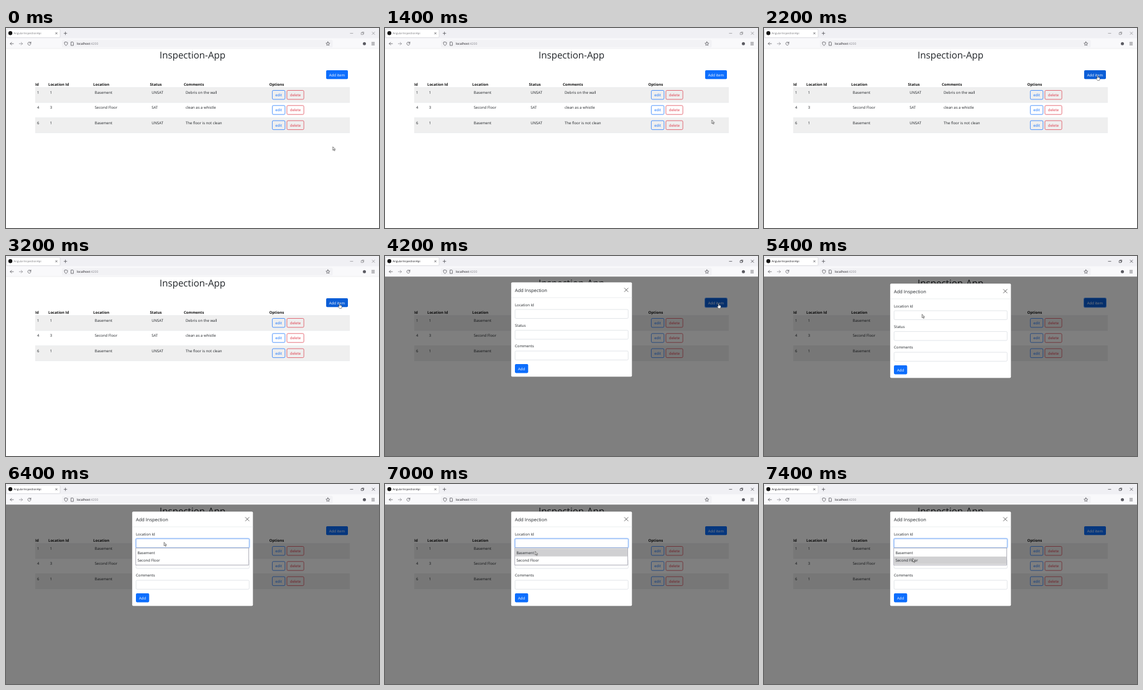
Write an HTML page that moves like this. It is 600 px wide and 322 px high and loops after 8000 ms.

```html
<!DOCTYPE html>
<html lang="en">
<head>
<meta charset="utf-8">
<title>Inspection-App</title>
<style>
  html, body { margin: 0; width: 100%; height: 100%; overflow: hidden; background: #fff; }
  svg { display: block; width: 600px; height: 322px; }
  text { font: 6px "Open Sans", "Noto Sans", sans-serif; fill: #212529; text-rendering: geometricPrecision; white-space: pre; }
  .mid { text-anchor: middle; }
  .head text { font-weight: 700; fill: #111; }
  .title { font-size: 15.1px; }
  .modal-title { font-size: 7.45px; }
  .tab-name { font-size: 4.45px; }
  .url { font-size: 5.1px; fill: #15141a; }
  .white { fill: #fff; }
  .icon { fill: none; stroke: #4a4a50; stroke-width: .7; stroke-linecap: round; stroke-linejoin: round; }
  .edit rect, .delete rect { fill: none; stroke: #0d6efd; stroke-width: .7; }
  .edit text { fill: #0d6efd; }
  .delete rect { stroke: #dc3545; }
  .delete text { fill: #dc3545; }
  .field { fill: #fff; stroke: #ced4da; stroke-width: .6; }

  .step { animation: 8s step-end infinite; }
  .tab-name { animation-name: tab-focus; }
  .controls { animation-name: controls-focus; }
  .add { animation-name: add-state; }
  .ring { animation-name: add-ring; }
  .overlay { animation-name: overlay; }
  .modal { animation-name: modal; }
  .open { animation-name: open; }
  .first { animation-name: first; }
  .second { animation-name: second; }
  .arrow { animation-name: arrow; }
  .hand { animation-name: hand; }

  @keyframes tab-focus { 0% { fill: #77777c } 52.5%, 100% { fill: #15141a } }
  @keyframes controls-focus { 0% { stroke: #8a8a8e } 52.5%, 100% { stroke: #3a3a40 } }
  @keyframes add-state {
    0% { fill: #0d6efd } 25% { fill: #0c65e6 } 27.5% { fill: #0b5ed7 } 80%, 100% { fill: #0d6efd }
  }
  @keyframes add-ring { 0% { opacity: 0 } 52.5% { opacity: 1 } 80%, 100% { opacity: 0 } }
  @keyframes overlay { 0% { opacity: 0 } 52.5%, 100% { opacity: 1 } }
  @keyframes modal { 0% { transform: translateY(-2px) } 55%, 100% { transform: none } }
  @keyframes open { 0% { opacity: 0 } 80%, 100% { opacity: 1 } }
  @keyframes first { 0% { opacity: 0 } 85% { opacity: 1 } 92.5%, 100% { opacity: 0 } }
  @keyframes second { 0% { opacity: 0 } 92.5%, 100% { opacity: 1 } }
  @keyframes hand { 0% { opacity: 0 } 25% { opacity: 1 } 57.5%, 100% { opacity: 0 } }
  @keyframes arrow {
    0% { transform: translate(525.5px, 191px) }
    5% { transform: translate(549px, 172px) }
    7.5% { transform: translate(421px, 238.5px) }
    12.5% { transform: translate(324.5px, 304px) }
    15% { transform: translate(392.5px, 259px) }
    17.5% { transform: translate(525.5px, 148px) }
    20% { transform: translate(551px, 88px) }
    22.5% { transform: translate(546.5px, 84px) }
    25% { transform: translate(-20px, -20px) }
    57.5% { transform: translate(287px, 90.3px) }
    62.5% { transform: translate(256.3px, 93.2px) }
    65% { transform: translate(254.2px, 93.2px) }
    67.5% { transform: translate(254px, 93.6px) }
    82.5% { transform: translate(247.5px, 100.3px) }
    85% { transform: translate(241.3px, 106.5px) }
    87.5% { transform: translate(241.3px, 108.3px) }
    90% { transform: translate(241.3px, 114px) }
    92.5%, 100% { transform: translate(239px, 119.6px) }
  }
</style>
</head>
<body>
<svg viewBox="0 0 600 322">
  <defs>
    <g id="actions">
      <g class="edit">
        <rect x="428.4" y="100.5" width="20.4" height="14.4" rx="1.8"/>
        <text class="mid" x="438.6" y="110.2">edit</text>
      </g>
      <g class="delete">
        <rect x="451.9" y="100.5" width="27.2" height="14.4" rx="1.8"/>
        <text class="mid" x="465.5" y="110.2">delete</text>
      </g>
    </g>
  </defs>

  <!-- page -->
  <rect width="600" height="322" fill="#fff"/>
  <text class="title mid" x="300" y="49">Inspection-App</text>
  <rect class="step ring" x="514" y="67" width="37" height="16.2" rx="2.8" fill="#3184fd" fill-opacity=".75"/>
  <rect class="step add" x="515" y="68" width="35" height="14.2" rx="1.8"/>
  <text class="white mid" x="532.4" y="77.5">Add item</text>

  <g class="head">
    <text x="47" y="93.2">Id</text>
    <text x="68" y="93.2">Location Id</text>
    <text x="140.3" y="93.2">Location</text>
    <text x="231.5" y="93.2">Status</text>
    <text x="286" y="93.2">Comments</text>
    <text x="423.5" y="93.2">Options</text>
  </g>
  <path d="M47 95.8h506v24.3H47zM47 144.4h506v24.3H47z" fill="#efefef"/>
  <path d="M47 95.8h506M47 120.1h506M47 144.4h506M47 168.7h506" stroke="#dee2e6" stroke-width=".5"/>
  <g>
    <text x="50" y="106.1">1</text>
    <text x="70.8" y="106.1">1</text>
    <text x="142.8" y="106.1">Basement</text>
    <text x="234.2" y="106.1">UNSAT</text>
    <text x="289" y="106.1">Debris on the wall</text>
    <use href="#actions"/>
  </g>
  <g transform="translate(0 24.3)">
    <text x="50" y="106.1">4</text>
    <text x="70.8" y="106.1">3</text>
    <text x="142.8" y="106.1">Second Floor</text>
    <text x="234.2" y="106.1">SAT</text>
    <text x="289" y="106.1">clean as a whistle</text>
    <use href="#actions"/>
  </g>
  <g transform="translate(0 48.7)">
    <text x="50" y="106.1">6</text>
    <text x="70.8" y="106.1">1</text>
    <text x="142.8" y="106.1">Basement</text>
    <text x="234.2" y="106.1">UNSAT</text>
    <text x="289" y="106.1">The floor is not clean</text>
    <use href="#actions"/>
  </g>

  <!-- dialog -->
  <g class="step overlay">
    <rect y="33" width="600" height="289" fill="#000" fill-opacity=".5"/>
    <g class="step modal">
      <rect x="202.8" y="44.2" width="194.6" height="152.4" rx="2" fill="#fff" stroke="#000" stroke-opacity=".3" stroke-width=".5"/>
      <text class="modal-title" x="209" y="59.6">Add Inspection</text>
      <path d="M385.2 53.7l5.8 5.8m0-5.8l-5.8 5.8" fill="none" stroke="#555" stroke-width=".9" stroke-linecap="round"/>
      <path d="M203 69h194.4" stroke="#dee2e6" stroke-width=".6"/>
      <text x="209" y="82.6">Location Id</text>
      <rect class="field" x="209.2" y="88.1" width="182" height="14.4" rx="1.6"/>
      <text x="209" y="116">Status</text>
      <rect class="field" x="209.2" y="121.6" width="182" height="14.4" rx="1.6"/>
      <text x="209" y="149.4">Comments</text>
      <rect class="field" x="209.2" y="155" width="182" height="14.4" rx="1.6"/>
      <rect x="209" y="176.1" width="21.3" height="14.3" rx="1.8" fill="#0d6efd"/>
      <text class="white mid" x="219.6" y="185.6">Add</text>
    </g>
  </g>
  <g class="step open">
    <rect x="208.5" y="87.4" width="183.4" height="15.8" rx="2.2" fill="none" stroke="#0d6efd" stroke-opacity=".25" stroke-width="1.5"/>
    <rect x="209.2" y="88.1" width="182" height="14.4" rx="1.6" fill="none" stroke="#86b7fe" stroke-width=".8"/>
    <rect x="208.8" y="103" width="181.8" height="27.6" fill="#fff" stroke="#8f8f9d" stroke-width=".7"/>
    <rect class="step first" x="209.2" y="104.2" width="181" height="12.4" fill="#d0d0d2"/>
    <rect class="step second" x="209.2" y="116.8" width="181" height="12.5" fill="#d0d0d2"/>
    <text x="211.4" y="112.9">Basement</text>
    <text x="211.4" y="125.4">Second Floor</text>
  </g>

  <!-- browser window -->
  <rect width="600" height="17" fill="#f0f0f4"/>
  <rect y="16.5" width="600" height="16.5" fill="#f9f9fb"/>
  <path d="M0 33h600" stroke="#dcdce0" stroke-width=".5"/>
  <rect x="1" y="2" width="86" height="13.4" rx="1.6" fill="#fff" stroke="#c4c4ca" stroke-width=".5"/>
  <circle cx="7" cy="8.3" r="3.2" fill="#111"/>
  <text class="step tab-name" x="12.3" y="10.2">AngularInspectionApi</text>
  <path class="icon" d="M79.7 7.2l2.7 2.7m0-2.7l-2.7 2.7M93.3 8.6h4.6m-2.3-2.3v4.6"/>
  <path class="icon step controls" d="M553.8 8.6h4.2M571.6 7.6h3v3h-3zM572.6 7.4v-.9h3v3h-.8M589 6.5l4 4m0-4l-4 4"/>
  <path class="icon" d="M12 25.2H6.8m2.2-2.2l-2.2 2.2 2.2 2.2"/>
  <path class="icon" d="M21.3 25.2h5.2m-2.2-2.2l2.2 2.2-2.2 2.2" opacity=".65"/>
  <path class="icon" d="M39.8 24a2.5 2.5 0 1 0 .2 1.8M40 22.4v1.9h-1.9"/>
  <rect x="90" y="19.2" width="435.5" height="12" rx="1.6" fill="#f2f2f5"/>
  <path class="icon" d="M96.5 22.5l2.5 .9c0 2.4-.6 3.8-2.5 4.9-1.9-1.1-2.5-2.5-2.5-4.9z"/>
  <path class="icon" d="M105 22.6h2.8l.6.7v4.8H105z"/>
  <text class="url" x="114" y="27.2">localhost<tspan fill="#8a8a90">:4200</tspan></text>
  <path class="icon" d="M517.8 22.2l.9 1.9 2.1.3-1.5 1.5.3 2.1-1.8-1-1.8 1 .3-2.1-1.5-1.5 2.1-.3z"/>
  <circle cx="576.5" cy="25.2" r="2.5" fill="#5b5b62"/>
  <path class="icon" d="M588.3 23.2h4.4m-4.4 2h4.4m-4.4 2h4.4"/>

  <!-- pointer -->
  <path class="step arrow" d="M.2 .2v5.6l1.3-1.2 1 2.2 1-.4-1-2.1h1.8z" fill="#fff" stroke="#222" stroke-width=".6" stroke-linejoin="round"/>
  <path class="step hand" d="M536 81.2v-4q0-.7.6-.7t.6.7v2l2 .4q1 .2 1 1.1v1.4l-.7 2.3h-3l-2.1-2.8q-.4-.8.3-.9z" fill="#fff" stroke="#222" stroke-width=".5" stroke-linejoin="round"/>
</svg>
</body>
</html>
```
